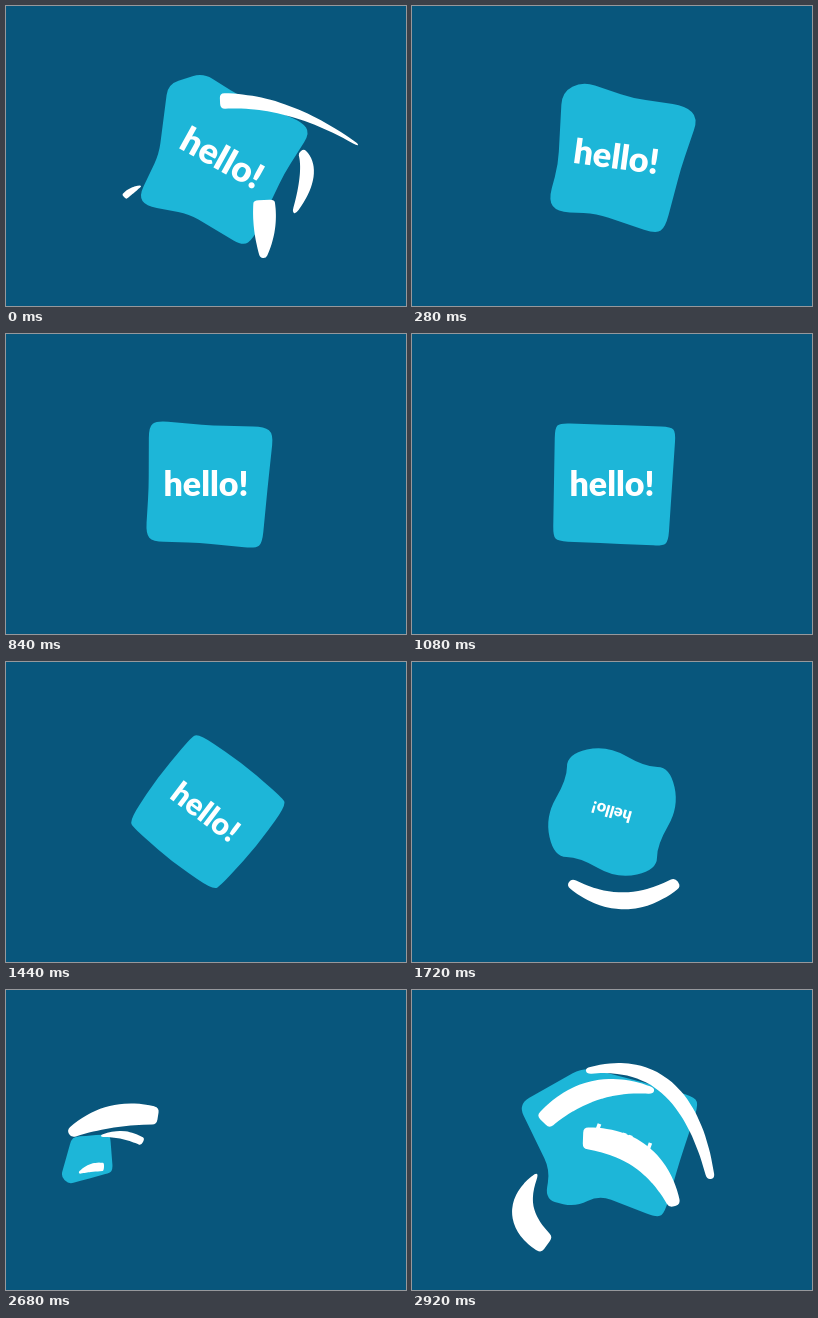
Animation, 400 px wide and 300 px high, one loop 2960 ms. Source, as an HTML page:

```html
<!DOCTYPE html>
<html lang="en">
<head>
<meta charset="utf-8">
<title>hello!</title>
<style>
  html, body { margin: 0; width: 100%; height: 100%; overflow: hidden; background: #08567c; }
  svg { display: block; width: 400px; height: 300px; }
  text { font: 900 34px Lato, "Open Sans", sans-serif; text-anchor: middle; fill: #fff; }
</style>
</head>
<body>
<svg viewBox="0 0 400 300">
  <path id="body" fill="#1db6d8"/>
  <text id="word" y="12.5">hello!</text>
  <g id="streaks" fill="#fff"></g>
</svg>
<script>
const LOOP = 2960, STEP = 40;
const $ = id => document.getElementById(id);
const lerp = (a, b, k) => a + (b - a) * k;
const mix = (p, q, k) => p.map((v, i) => lerp(v, q[i], k));
const shift = (p, q) => p.map((v, i) => v + q[i]);
const linear = k => k;
const easeOut = k => 1 - (1 - k) ** 1.5;
const easeIn = k => k ** 2.4;
const easeBoth = k => k * k * (3 - 2 * k);

function rotate([x, y], degrees) {
  const a = degrees * Math.PI / 180, c = Math.cos(a), s = Math.sin(a);
  return [x * c - y * s, x * s + y * c];
}

// Point at most `distance` from p on the way to q, never past the middle.
function toward(p, q, distance) {
  const len = Math.hypot(q[0] - p[0], q[1] - p[1]) || 1;
  return mix(p, q, Math.min(distance / len, 0.5));
}

// Closed polygon with each corner cut and curved.
function roundedPath(points, radius) {
  const n = points.length, text = p => p.map(v => v.toFixed(2)).join();
  return points.map((p, i) => {
    const before = toward(p, points[(i + n - 1) % n], radius);
    const after = toward(p, points[(i + 1) % n], radius);
    return `${i ? 'L' : 'M'}${text(before)}Q${text(p)} ${text(after)}`;
  }).join('') + 'Z';
}

// Segment around t; each key carries the ease of the segment it starts.
function segment(keys, t) {
  let i = 0;
  while (i < keys.length - 2 && keys[i + 1].t <= t) i++;
  const a = keys[i], b = keys[i + 1];
  return [a, b, a.ease(Math.min(1, (t - a.t) / (b.t - a.t)))];
}

// Outlines: two points per corner, one per side, clockwise from the word's top left.
const tilted = [[162,78],[197,67],[234,90],[296,116],[304,127],[278,168],
  [247,233],[237,240],[183,208],[140,200],[133,190],[153,148]];
const wobbly = [[143,90],[156,83],[214,93],[258,92],[274,104],[264,160],
  [256,213],[247,219],[185,207],[148,208],[138,196],[143,165]];
const flung = [[106,114],[172,77],[230,92],[280,106],[287,113],[268,170],
  [253,222],[246,228],[187,205],[164,217],[133,210],[138,180]];
const chamfered = (corners, cuts) => corners.flatMap((p, i) => {
  const next = corners[(i + 1) % 4], before = corners[(i + 3) % 4];
  return [toward(p, before, cuts[i]), toward(p, next, cuts[i]), mix(p, next, 0.5)];
});
const calm = chamfered([[143,89],[264,93],[256,212],[141,207]], [5, 5, 5, 5]);
const small = chamfered([[66,147],[104,144],[107,182],[52,197]], [3, 3, 3, 11]);
const blob = [0, 90, 180, 270].flatMap(a =>
  [[45,33],[45,58],[5,67]].map(p => shift(rotate(p, a), [200, 150])));
const dot = (x, y) => calm.map(() => [x, y]);

function pose(t, angle, radius, points, ease = linear) {
  const mid = points.reduce(shift).map(v => v / points.length);
  const local = points.map(p => rotate([p[0] - mid[0], p[1] - mid[1]], -angle));
  return { t, angle, radius, mid, local, ease };
}

const bodyKeys = [
  pose(0, 29, 11, tilted, easeOut),
  pose(600, 7, 14, wobbly, easeOut),
  pose(1080, 2, 10, calm),
  pose(1160, 2, 10, calm, easeIn),
  pose(1720, 190, 60, blob),
  pose(2080, 400, 60, dot(200, 150)),
  pose(2520, -20, 4, dot(140, 140)),
  pose(2680, 0, 5, small, easeBoth),
  pose(2920, 20, 13, flung),
  pose(LOOP, 29, 11, tilted)
];

const wordAt = (t, x, y, angle, scale, ease = linear) => ({ t, v: [x, y, angle, scale], ease });
const wordKeys = [
  wordAt(0, 216.5, 151.5, 29, 1.04, easeOut),
  wordAt(480, 200, 149.5, 0, 1),
  wordAt(1160, 200, 149.5, 0, 1, easeIn),
  wordAt(1720, 199.5, 150, 196, 0.48),
  wordAt(1920, 200, 150, 300, 0),
  wordAt(2760, 110, 190, 0, 0, easeBoth),
  wordAt(2920, 210, 152, 20, 0.72),
  wordAt(LOOP, 216.5, 151.5, 29, 1.04)
];

// Arc from tail to head; `sag` and `skew` move its control point across and along.
function arc(x0, y0, x1, y1, sag, skew = 0) {
  const dx = x1 - x0, dy = y1 - y0, len = Math.hypot(dx, dy);
  const cx = (x0 + x1) / 2 + (dx * skew - dy * sag) / len;
  const cy = (y0 + y1) / 2 + (dy * skew + dx * sag) / len;
  return { x0, y0, cx, cy, x1, y1 };
}

const streaks = [];
function streak(peak, lead, fade, curve, [tail, head, belly = Math.max(tail, head)], opacity = 1) {
  const path = document.createElementNS('http://www.w3.org/2000/svg', 'path');
  path.setAttribute('opacity', opacity);
  $('streaks').append(path);
  streaks.push({ peak, lead, fade, curve, tail, head, belly, path });
}

streak(0, 40, 200, arc(214, 95, 352, 139, -23, -10), [16, 2, 10]);
streak(0, 40, 240, arc(295, 145, 288, 207, -17, -14), [7, 4, 14]);
streak(0, 40, 280, arc(258, 194, 257, 252, -2), [21, 6]);
streak(0, 40, 160, arc(135, 180, 118, 191, 2), [1, 6]);

streak(1720, 120, 120, arc(266, 220, 157, 220, -38), [11, 9, 17]);
streak(2120, 120, 100, arc(188, 130, 215, 155, -14), [8, 5, 11]);
streak(2120, 160, 60, arc(176, 119, 200, 117, -6), [4, 1], 0.5);
streak(2120, 120, 40, arc(247, 134, 249, 149, 0), [1, 1, 2.5], 0.8);
streak(2240, 80, 40, arc(199, 165, 210, 174, -3), [2, 2, 4]);

streak(2680, 160, 160, arc(152, 126, 63, 144, 17), [17, 9, 22]);
streak(2680, 120, 120, arc(95, 146, 137, 152, -8), [2, 8]);
streak(2680, 80, 80, arc(73, 183, 98, 177, -4), [2, 8]);

streak(2920, 200, 40, arc(174, 81, 299, 189, -81, -21), [6, 8, 15]);
streak(2920, 200, 40, arc(131, 132, 242, 101, -33), [18, 6, 20]);
streak(2920, 160, 40, arc(171, 148, 263, 216, -39), [21, 12, 25]);
streak(2920, 200, 40, arc(125, 184, 135, 255, 38), [3, 20, 23]);

function streakPath({ curve: c, tail, head, belly }, from, to, thick) {
  const left = [], right = [], count = 10;
  const bend = (a, b, d, u) => (1 - u) ** 2 * a + 2 * u * (1 - u) * b + u * u * d;
  for (let i = 0; i <= count; i++) {
    const u = lerp(from, to, i / count);
    const x = bend(c.x0, c.cx, c.x1, u), y = bend(c.y0, c.cy, c.y1, u);
    const dx = lerp(c.cx - c.x0, c.x1 - c.cx, u), dy = lerp(c.cy - c.y0, c.y1 - c.cy, u);
    const width = bend(tail, 2 * belly - (tail + head) / 2, head, u);
    const k = thick * width / 2 / (Math.hypot(dx, dy) || 1);
    left.push([x - dy * k, y + dx * k]);
    right.unshift([x + dy * k, y - dx * k]);
  }
  return roundedPath([...left, ...right], 5);
}

// Grows from its tail until the peak, then drains toward its head.
function drawStreak(s, time) {
  const t = time - s.peak - (time > s.peak + LOOP - s.lead ? LOOP : 0);
  let d = '';
  if (t > -s.lead && t <= 0) {
    const k = 1 + t / s.lead;
    d = streakPath(s, 0, k, Math.sqrt(k));
  } else if (t > 0 && t < s.fade) {
    const k = t / s.fade;
    d = streakPath(s, k, 1, 1 - k);
  }
  s.path.setAttribute('d', d);
}

function drawBody(t) {
  const [a, b, k] = segment(bodyKeys, t);
  const angle = lerp(a.angle, b.angle, k), mid = mix(a.mid, b.mid, k);
  const points = a.local.map((p, i) => shift(rotate(mix(p, b.local[i], k), angle), mid));
  const hidden = t >= 2080 && t <= 2520;
  $('body').setAttribute('d', hidden ? '' : roundedPath(points, lerp(a.radius, b.radius, k)));
}

function drawWord(t) {
  const [a, b, k] = segment(wordKeys, t);
  const [x, y, angle, scale] = mix(a.v, b.v, k);
  $('word').setAttribute('transform', `translate(${x} ${y}) rotate(${angle}) scale(${scale})`);
  $('word').setAttribute('visibility', scale > 0.01 ? 'visible' : 'hidden');
}

const origin = performance.now();
function draw() {
  const elapsed = Math.max(0, performance.now() - origin) % LOOP;
  const t = Math.floor(elapsed / STEP) * STEP;
  drawBody(t);
  drawWord(t);
  streaks.forEach(s => drawStreak(s, t));
  requestAnimationFrame(draw);
}
draw();
</script>
</body>
</html>
```
